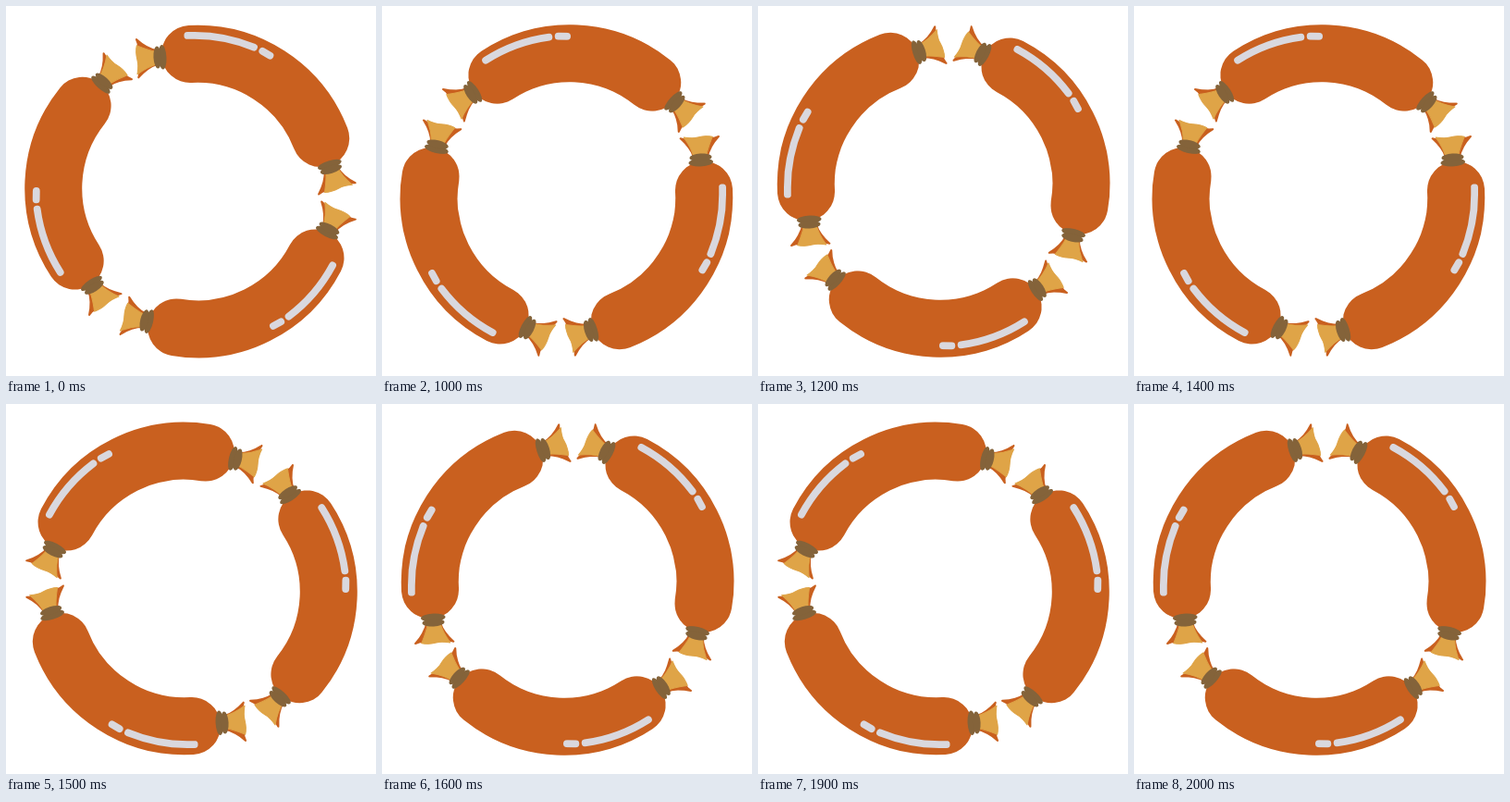
Recreate the animation shown at these times as an HTML page. Size 400 by 400 pixels, loop 2100 ms.

```html
<!DOCTYPE html>
<html lang="en">
<head>
<meta charset="utf-8">
<title>Sausage ring</title>
<style>
  html, body { margin: 0; width: 100%; height: 100%; overflow: hidden; background: #fff; }
  svg { display: block; width: 100vw; height: 100vh; }
  .ring { transform-origin: 200px 200px; animation: turn 2100ms infinite; }
  /* rest for one second, then eleven quarter turns, 100 ms each */
  @keyframes turn {
    0% { transform: rotate(0deg); animation-timing-function: step-end; }
    47.619% { transform: rotate(0deg); animation-timing-function: steps(11, start); }
    100% { transform: rotate(990deg); }
  }
  .skin { fill: none; stroke: #c9601f; stroke-width: 62; stroke-linecap: round; }
  .shine { fill: none; stroke: #d9d8de; stroke-width: 7.8; stroke-linecap: round; }
  .flap { fill: #c9601f; stroke: #c9601f; stroke-width: 2; stroke-linejoin: round; }
  .paper { fill: #dfa447; stroke: #dfa447; stroke-width: 1; stroke-linejoin: round; }
  .string { fill: #84633a; }
</style>
</head>
<body>
<svg viewBox="0 0 400 400">
  <defs>
    <!-- tied end, pointing along +x -->
    <g id="knot">
      <path class="flap" d="M2 -7C11 -9 18 -14 24.5 -20.7Q22.5 -16 23 -12L23 12Q22.5 16 24.5 20.7C18 14 11 9 2 7Z"/>
      <path class="paper" d="M2 -7C10 -8.5 18 -12 25.5 -17Q23.500 -8 24.7 -2Q26.5 7 24.5 14C17 10.5 10 7 2 6Z"/>
      <ellipse class="string" cx="-2.6" rx="4.3" ry="13.3"/>
      <ellipse class="string" cx="2.8" rx="4.3" ry="12"/>
    </g>
    <!-- bent around the origin, middle at the top -->
    <g id="sausage">
      <path class="skin" d="M-84 -121.7A143 143 0 0 1 84 -121.7"/>
      <path class="shine" d="M-97.1 -137.1A168 168 0 0 1 -30 -165.3M-19.9 -166.8L-10.5 -167.1"/>
      <use href="#knot" transform="translate(-109.5 -101.3) rotate(144)"/>
      <use href="#knot" transform="translate(109.5 -101.3) rotate(40)"/>
    </g>
  </defs>
  <g class="ring">
    <use href="#sausage" transform="translate(203.7 199.8) rotate(32.8)"/>
    <use href="#sausage" transform="translate(205 201) rotate(153.5)"/>
    <use href="#sausage" transform="translate(200.2 197.4) rotate(272.7)"/>
  </g>
</svg>
</body>
</html>
```
